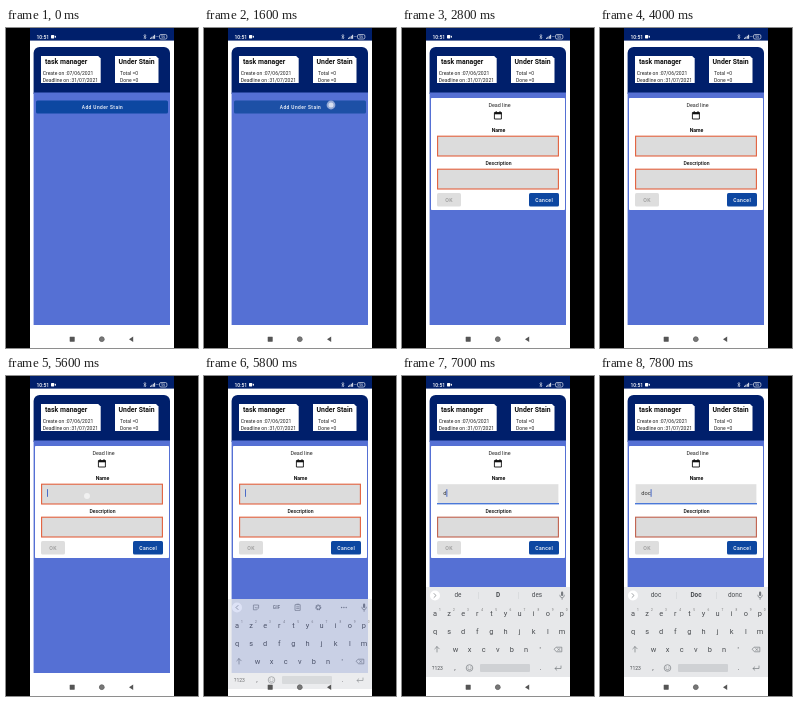
An HTML page for the animation above (8000 ms loop, 192x320 px).

```html
<!DOCTYPE html>
<html lang="en">
<head>
<meta charset="utf-8">
<title>Task manager</title>
<style>
html, body { margin: 0; width: 100%; height: 100%; overflow: hidden; background: #000; }
svg { display: block; width: 100vw; height: 100vh; }
text { font-family: Roboto, "Open Sans", sans-serif; }
.mid { text-anchor: middle; }
.line { fill: none; stroke: #777b80; stroke-width: .7; stroke-linecap: round; stroke-linejoin: round; }
</style>
</head>
<body>
<svg id="stage" viewBox="0 0 192 320"></svg>
<script>
const LOOP = 8000, STEP = 200;
const NAVY = '#001f6b', BLUE = '#5570d4', BUTTON = '#0d47a1', RED = '#e2603c';
const INK = '#4a4d51', ICON = '#777b80';
const stage = document.getElementById('stage');

function add(parent, tag, attrs = {}, content) {
  const node = document.createElementNS('http://www.w3.org/2000/svg', tag);
  for (const key in attrs) node.setAttribute(key, attrs[key]);
  if (content !== undefined) node.textContent = content;
  return parent.appendChild(node);
}
const group = parent => add(parent, 'g');
const rect = (p, x, y, width, height, fill, more) =>
  add(p, 'rect', { x, y, width, height, fill, ...more });
const dot = (p, cx, cy, r, fill, more) => add(p, 'circle', { cx, cy, r, fill, ...more });
const line = (p, d, more) => add(p, 'path', { d, class: 'line', ...more });
const shape = (p, d, fill) => add(p, 'path', { d, fill });
const text = (p, s, x, y, size, fill, more) =>
  add(p, 'text', { x, y, 'font-size': size, fill, ...more }, s);
const label = (p, s, x, y, size, fill, more) =>
  text(p, s, x, y, size, fill, { class: 'mid', ...more });
const show = (node, on) => node.setAttribute('visibility', on ? 'inherit' : 'hidden');
const bold = { 'font-weight': 700 }, medium = { 'font-weight': 500 };

// Screen and status bar
rect(stage, 24, 0, 144, 320, '#fff');
rect(stage, 24, 0, 144, 12.6, NAVY);
text(stage, '10:51', 30.5, 10.7, 5, '#fff', medium);
rect(stage, 45, 7, 3.2, 3.4, '#fff', { rx: .6 });
shape(stage, 'M48.4 8.7l1.6-1.2v2.4z', '#fff');
line(stage, 'M137.8 7.6l2.2 2.2-1.1 1.2V6.4l1.1 1.2-2.2 2.2', { style: 'stroke:#fff;stroke-width:.5' });
for (let i = 0; i < 4; i++) rect(stage, 144 + i * 1.4, 9.8 - i, .9, 1 + i, '#fff');
text(stage, '4G', 149.6, 8.6, 2.4, '#fff');
rect(stage, 153.5, 6.5, 7.4, 4.5, 'none', { rx: 1.5, stroke: '#fff', 'stroke-width': .6 });
label(stage, '56', 157.2, 10, 3.4, '#fff');

// Page
shape(stage, 'M27.6 66V25a6 6 0 0 1 6-6H158a6 6 0 0 1 6 6V66z', NAVY);
rect(stage, 27.6, 64.5, 136.4, 232.5, BLUE);
function note(x, width, title, titleX, size, lines, lineX) {
  shape(stage, `M${x} 28h${width - 2.5}l2.5 2.5v24.5h-${width}z`, '#fff');
  text(stage, title, titleX, 35.7, size, '#111', bold);
  lines.forEach((s, i) => text(stage, s, lineX, 46.8 + i * 6.8, 5, '#222'));
}
note(35, 59.7, 'task manager', 39, 6.9, ['Create on :07/06/2021', 'Deadline on :31/07/2021'], 36.8);
note(109, 43.5, 'Under Stain', 112.5, 6.9, ['Total =0', 'Done =0'], 114);

const addButton = group(stage);
const buttonFace = rect(addButton, 30, 72.5, 132, 13, BUTTON, { rx: 1.5 });
label(addButton, 'Add Under Stain', 96.5, 80.8, 4.8, '#fff', { ...medium, 'letter-spacing': .45 });
const tap = group(addButton);
dot(tap, 127, 77, 4.4, '#b9c6e4', { opacity: .75 });
dot(tap, 127, 77, 2.5, '#e8edf8', { opacity: .8 });

// Dialog
const dialog = group(stage);
rect(dialog, 29, 70, 134, 112, '#fff', { rx: .8 });
label(dialog, 'Dead line', 97.5, 78.6, 5.4, '#222');
line(dialog, 'M92.8 84.6h6.6v6.4h-6.6zM94.2 83.4v1M98 83.4v1', { style: 'stroke:#111;stroke-width:.9' });
rect(dialog, 92.5, 84.3, 7.2, 2, '#111');
label(dialog, 'Name', 96.5, 104.4, 5.2, '#111', bold);
label(dialog, 'Description', 96.5, 137.3, 5.1, '#111', medium);
const field = y => rect(dialog, 35.6, y, 120.8, 19.8, '#dcdcdc', { stroke: RED, 'stroke-width': 1.1 });
const nameField = field(108.2), infoField = field(141.2);
const nameLine = rect(dialog, 35, 127, 122, 1.4, '#4a78d8');
const entry = text(dialog, '', 41.3, 119.4, 5.7, '#333');
const caret = rect(dialog, 41, 113.2, .9, 7.6, '#3b5fc4');
const fieldTap = dot(dialog, 81, 120, 3, '#f4f4f4', { opacity: .85 });
rect(dialog, 35, 165, 24, 13.5, '#dedede', { rx: 1.6 });
label(dialog, 'OK', 47, 173.8, 5.2, '#999', { ...medium, 'letter-spacing': .4 });
rect(dialog, 127, 165, 30, 13.5, BUTTON, { rx: 1.6 });
label(dialog, 'Cancel', 142.2, 173.7, 5, '#fff', { ...medium, 'letter-spacing': .45 });

// Keyboard
const keyboard = group(stage);
rect(keyboard, 24, 211, 144, 90, '#e7e8ea');
const press = dot(keyboard, 0, 0, 6.5, '#d4d6d9');
function keyRow(letters, x, y) {
  [...letters].forEach((c, i) => label(keyboard, c, x + i * 14.1, y, 7.4, INK));
}
keyRow('azertyuiop', 33, 240);
keyRow('qsdfghjklm', 33, 257.5);
keyRow("wxcvbn'", 53.5, 275.7);
[...'1234567890'].forEach((c, i) => label(keyboard, c, 37.8 + i * 14.1, 234.8, 3.2, '#777'));
line(keyboard, 'M35 276v-5.4M32.8 272.8l2.2-2.2 2.2 2.2');
line(keyboard, 'M154.4 271.2h5.4v4.6h-5.4l-2-2.3zM155.8 272.5l2 2M157.8 272.5l-2 2');
label(keyboard, '?123', 35.5, 294.3, 5, INK);
label(keyboard, ',', 53, 294, 7, INK);
dot(keyboard, 67.5, 292, 3.3, 'none', { stroke: ICON, 'stroke-width': .7 });
line(keyboard, 'M66.2 291v.1M68.8 291v.1M65.8 293q1.7 2 3.4 0');
rect(keyboard, 78, 288, 50, 8, '#cfd1d4', { rx: 1 });
label(keyboard, '.', 138.5, 294, 7, INK);
line(keyboard, 'M159 290v2.5H153M154.8 290.8l-1.8 1.7 1.8 1.7');

dot(keyboard, 33, 219.5, 5, '#fff');
const chevron = line(keyboard, 'M34 217.5l-2 2 2 2');
rect(keyboard, 159, 215.6, 2.2, 4.4, ICON, { rx: 1.1 });
line(keyboard, 'M157.8 219.2q.2 2.6 2.3 2.6t2.3-2.6M160.1 222v1.4');

const tools = group(keyboard);
line(tools, 'M49.8 217h4.8v3l-1.8 1.8h-3zM51 219.6q1.1 1.1 2.3 0');
label(tools, 'GIF', 72.5, 221.2, 4.8, '#666a6f', medium);
line(tools, 'M91.4 216.7h4.8v5.7h-4.8zM92.8 216.2h2M92.6 218.8h2.4M92.6 220.4h2.4');
dot(tools, 114.3, 219.4, 2.4, 'none', { stroke: ICON, 'stroke-width': 1.1, 'stroke-dasharray': '1.2 .68' });
dot(tools, 114.3, 219.4, 1.8, 'none', { stroke: ICON, 'stroke-width': .8 });
for (let i = 0; i < 3; i++) dot(tools, 137.6 + i * 2.3, 219.5, .7, ICON);

const hints = group(keyboard);
const words = [56, 96, 135].map((x, i) => label(hints, '', x, 221.4, 6.4, INK, i === 1 ? bold : {}));
for (const x of [76, 116]) rect(hints, x, 216, .5, 7, '#cdd0d3');

// Navigation bar
rect(stage, 63.7, 308.7, 5, 5, '#555', { rx: .4 });
dot(stage, 95.8, 311.2, 2.4, '#777', { stroke: '#666', 'stroke-width': .9 });
shape(stage, 'M123 311.2l4.2-2.7v5.4z', '#555');

const typed = [
  { at: 6800, text: 'd', hints: ['de', 'D', 'des'] },
  { at: 7400, text: 'do', hints: ['do', 'Do', 'dont'] },
  { at: 7800, text: 'doc', hints: ['doc', 'Doc', 'donc'] }
];
const presses = [
  { from: 6800, to: 7000, x: 61.2, y: 255 },
  { from: 7400, to: 7600, x: 146, y: 237.5 }
];

function draw(time) {
  const t = Math.floor(time % LOOP / STEP) * STEP;
  const within = (a, b) => t >= a && t < b;
  const open = t >= 1800, settled = t >= 6000;

  show(addButton, !open);
  show(tap, within(1600, 1800));
  buttonFace.setAttribute('fill', within(1600, 1800) ? '#1d50a6' : BUTTON);
  show(dialog, open);

  const state = typed.filter(s => s.at <= t).pop();
  entry.textContent = state ? state.text : '';
  caret.setAttribute('x', 41 + (state ? entry.getComputedTextLength() + .2 : 0));
  show(caret, t >= 5600 && !within(6200, 6600));
  show(fieldTap, within(5600, 5800));
  nameField.setAttribute('stroke', state ? 'none' : RED);
  nameField.setAttribute('fill', state ? '#e0e0e0' : '#dcdcdc');
  infoField.setAttribute('stroke', state ? '#c0604c' : RED);
  show(nameLine, !!state);

  show(keyboard, t >= 5800);
  keyboard.setAttribute('transform', `translate(0 ${settled ? 0 : 12})`);
  keyboard.setAttribute('opacity', settled ? 1 : .8);

  const turn = t >= 7000 ? 180 : t >= 6800 ? 90 : 0;
  chevron.setAttribute('transform', `rotate(${turn} 33 219.5)`);
  show(tools, within(5800, 6800));
  show(hints, t >= 7000);
  if (state) words.forEach((w, i) => { w.textContent = state.hints[i]; });

  const key = presses.find(p => within(p.from, p.to));
  show(press, !!key);
  if (key) {
    press.setAttribute('cx', key.x);
    press.setAttribute('cy', key.y);
  }
}

const start = performance.now();
function tick() {
  draw(performance.now() - start);
  requestAnimationFrame(tick);
}
tick();
</script>
</body>
</html>
```
